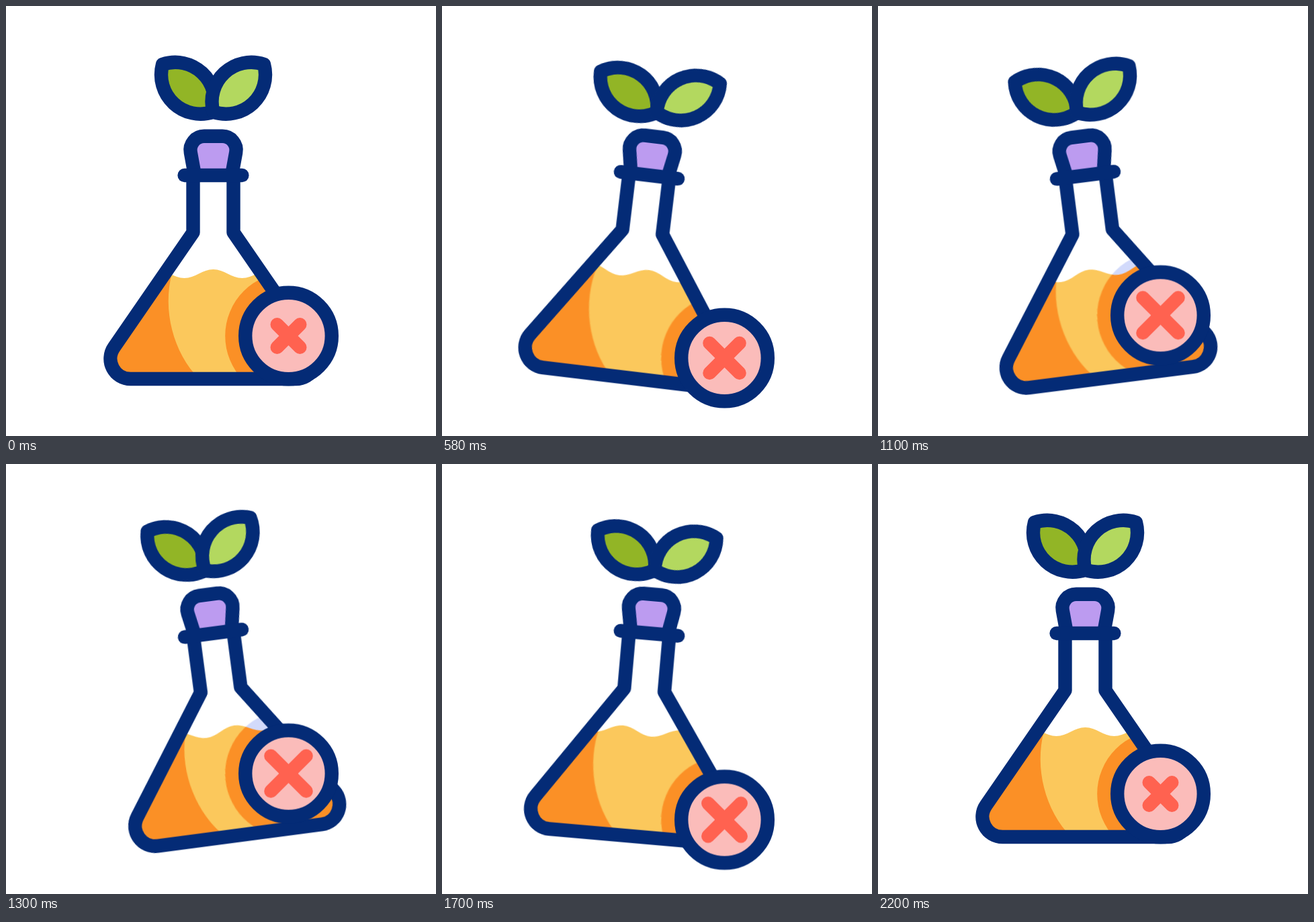
Write an HTML page that moves like this. It is 640x640 px and loops after 2.4 s.

```html
<!DOCTYPE html>
<html lang="en">
<head>
<meta charset="utf-8">
<title>Flask</title>
<style>
  html, body { margin: 0; width: 100%; height: 100%; overflow: hidden; background: #fff; }
  svg { display: block; width: 100%; height: 100%; }

  .line { fill: none; stroke: #042b76; stroke-width: 20.4; stroke-linecap: round; stroke-linejoin: round; }

  .turn, .bob, .leaf, .wave, .cross {
    animation: 2400ms cubic-bezier(.33333, 0, .66667, 1) infinite;
  }

  /* --k: -1 undoes the motion of an outer group */
  .turn { animation-name: turn; transform-origin: 308.5px 252px; --k: 1; }
  .wave { animation-name: wave; --k: 1; }
  .turn.undo, .wave.undo { --k: -1; }
  .bob { animation-name: bob; }
  .leaf { animation-name: leaf; transform-origin: 308.5px 157px; }
  .leaf.left { --far: -20deg; --near: -15.5deg; }
  .leaf.right { --far: 17deg; --near: 12.8deg; }
  .cross { animation-name: cross; stroke: #ff6250; stroke-width: 20; }

  @keyframes turn {
    0%, 8.3333%, 91.6667%, 100% { transform: rotate(0deg); }
    29.1667% { transform: rotate(calc(var(--k) * 8deg)); }
    50% { transform: rotate(calc(var(--k) * -9deg)); }
    70.8333% { transform: rotate(calc(var(--k) * 5deg)); }
  }
  @keyframes bob {
    0%, 8.3333%, 91.6667%, 100% { transform: translateY(0); }
    29.1667%, 70.8333% { transform: translateY(38.5px); }
    50% { transform: translateY(-38.5px); }
  }
  @keyframes leaf {
    0%, 8.3333%, 58.3333%, 91.6667%, 100% { transform: rotate(0deg); }
    33.3333% { transform: rotate(var(--far)); }
    75% { transform: rotate(var(--near)); }
  }
  /* two wavelengths per loop */
  @keyframes wave {
    0%, 8.3333% { transform: translateX(0); }
    91.6667%, 100% { transform: translateX(calc(var(--k) * 172px)); }
  }
  @keyframes cross {
    0%, 8.3333%, 91.6667%, 100% { d: path("M403.5 474L437.5 508M437.5 474L403.5 508"); }
    37.5%, 62.5% { d: path("M394.2 464.7L446.8 517.3M446.8 464.7L394.2 517.3"); }
  }
</style>
</head>
<body>
<svg viewBox="0 0 640 640">
  <defs>
    <path id="glass" d="M278.5 252V337L160.8 507.9A30 30 0 0 0 185.5 555H431.5A30 30 0 0 0 456.2 507.9L338.5 337V252"/>
    <clipPath id="inside"><use href="#glass"/></clipPath>
    <clipPath id="surface">
      <path d="M-35.5 392c15.7 0 27.3 13 43 13s27.3-13 43-13 27.3 13 43 13 27.3-13 43-13 27.3 13 43 13 27.3-13 43-13 27.3 13 43 13 27.3-13 43-13 27.3 13 43 13 27.3-13 43-13 27.3 13 43 13 27.3-13 43-13 27.3 13 43 13 27.3-13 43-13V600H-35.5Z"/>
    </clipPath>
  </defs>

  <g class="turn">
    <g clip-path="url(#inside)">
      <g class="turn undo"><circle class="bob" cx="420.5" cy="491" r="94.3" fill="#d2dafb"/></g>
      <g class="wave" clip-path="url(#surface)">
        <g class="wave undo">
          <path d="M120 370H500V570H120Z" fill="#fbc85c"/>
          <path d="M250 388C232 440 244 505 281 548V570H120V388Z" fill="#fb9026"/>
          <g class="turn undo"><circle class="bob" cx="420.5" cy="491" r="94.3" fill="#fb9026"/></g>
        </g>
      </g>
    </g>
    <use href="#glass" class="line"/>
    <path class="line" style="fill:#bc9bf0" d="M281 252L274.8 218A20.5 20.5 0 0 1 295 193.8H322A20.5 20.5 0 0 1 342.2 218L336 252"/>
    <path class="line" d="M265.6 252H351.4"/>
    <path class="line leaf left" style="fill:#92b526" d="M233 87A58.5 58.5 0 0 1 308.5 157.5A58.5 58.5 0 0 1 233 87Z"/>
    <path class="line leaf right" style="fill:#b3d85f" d="M384 87A58.5 58.5 0 0 0 308.5 157.5A58.5 58.5 0 0 0 384 87Z"/>
  </g>

  <g class="bob">
    <circle class="line" style="fill:#fbbcba" cx="420.5" cy="491" r="64.3"/>
    <path class="line cross" d="M403.5 474L437.5 508M437.5 474L403.5 508"/>
  </g>
</svg>
</body>
</html>
```
